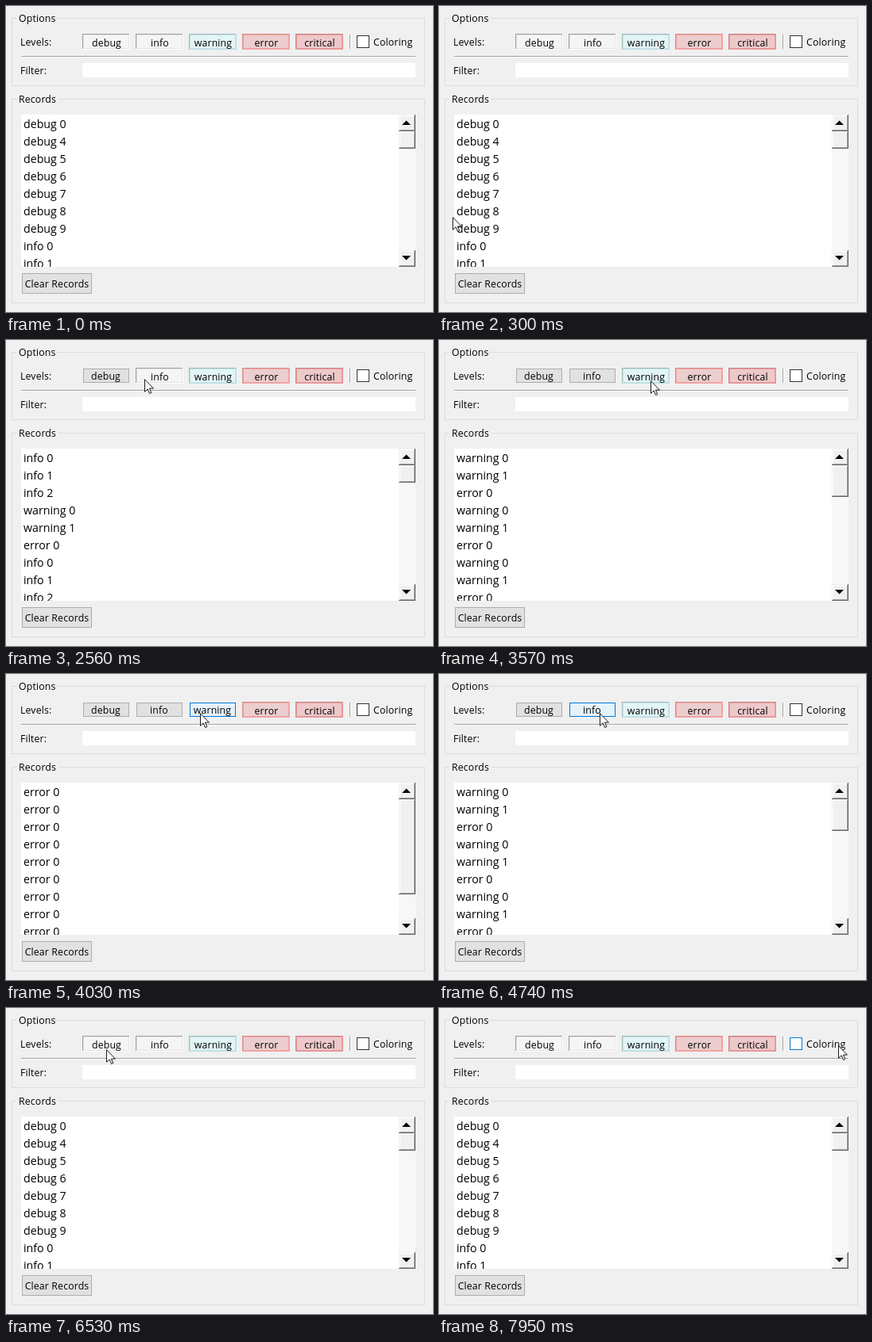
An HTML page that plays this animation: 537 px wide and 386 px high, repeating every 8000 ms.

```html
<!DOCTYPE html>
<html lang="en">
<head>
<meta charset="utf-8">
<title>Log records filter</title>
<style>
  html, body { margin: 0; width: 100%; height: 100%; overflow: hidden; background: #f0f0f0; }
  svg { display: block; }
  text { font: 12.3px "Open Sans", "Noto Sans", sans-serif; letter-spacing: .15px; fill: #000; white-space: pre; }
  .row { font-size: 14.2px; letter-spacing: 0; }
  rect { shape-rendering: crispEdges; }
</style>
</head>
<body>
<svg width="537" height="386" viewBox="0 0 537 386">
  <defs id="defs"></defs>
  <g id="view"></g>
</svg>
<script>
const LOOP = 8000, TICK = 78;

// Mouse glides: start and end time, goal, sideways bow of the path
const ENTRY = { x: 104, y: 400 };
const GLIDES = [
  { from: 140, to: 1000, x: 141, y: 49, bowX: -108 },
  { from: 2560, to: 2620, x: 187, y: 49 },
  { from: 3400, to: 3570, x: 266, y: 51 },
  { from: 3720, to: 3870, x: 244, y: 49 },
  { from: 4740, to: 4740, x: 202, y: 49 },
  { from: 4820, to: 4970, x: 187, y: 46 },
  { from: 5680, to: 5920, x: 126, y: 52 },
  { from: 7390, to: 7950, x: 502, y: 47, bowY: 22 }
];

// Mouse button: [down, up, level]
const CLICKS = [
  [1310, 1460, "debug"], [2870, 3030, "info"], [3870, 4030, "warning"],
  [4510, 4660, "warning"], [5460, 5600, "info"], [6380, 6530, "debug"]
];

// Checked look of each level: fill, outer edge, inner edge, light edge
const LEVELS = {
  debug: ["#f5f5f5", "#a0a0a0", "#e3e3e3", "#fff"],
  info: ["#f5f5f5", "#a0a0a0", "#e3e3e3", "#fff"],
  warning: ["#e2f5f7", "#a0b8ba", "#c4e4e6", "#b9dfe2"],
  error: ["url(#error)", "#d98c8c", "#f0a4a4", "#f7a0a0"],
  critical: ["url(#critical)", "#cf8486", "#e69c9e", "#e89496"]
};

const SETS = 10;
const NUMBERS = { debug: [0, 4, 5, 6, 7, 8, 9], info: [0, 1, 2], warning: [0, 1], error: [0] };

const rect = (x, y, w, h, fill) => `<rect x="${x}" y="${y}" width="${w}" height="${h}" fill="${fill}"/>`;
const framed = (x, y, w, h, fill, edge) => rect(x, y, w, h, edge) + rect(x + 1, y + 1, w - 2, h - 2, fill);
const label = (x, y, s, extra = "") => `<text x="${x}" y="${y}" ${extra}>${s}</text>`;
const bevel = (x, y, w, h, fill, light, dark) =>
  rect(x, y, w, h, dark) + rect(x, y, w - 1, h - 1, light) + rect(x + 1, y + 1, w - 2, h - 2, fill);
const raised = (x, y, w, h) =>
  bevel(x, y, w, h, "#f0f0f0", "#f0f0f0", "#696969") +
  bevel(x + 1, y + 1, w - 2, h - 2, "#f0f0f0", "#fff", "#a0a0a0");
const inside = (p, x, y, w, h) => p && p.x >= x && p.x < x + w && p.y >= y && p.y < y + h;

const checker = (id, a, b) =>
  `<pattern id="${id}" width="2" height="2" patternUnits="userSpaceOnUse">` +
  rect(0, 0, 2, 2, a) + rect(0, 0, 1, 1, b) + rect(1, 1, 1, 1, b) + "</pattern>";

document.getElementById("defs").innerHTML =
  checker("error", "#d9d2d2", "#ffc9c9") + checker("critical", "#ffc2c4", "#dcd0d0") +
  checker("track", "#f0f0f0", "#fff") +
  `<clipPath id="list">${rect(19, 137, 475, 192, "#fff")}</clipPath>`;

function group(y, h, title, gap) {
  return framed(7, y, 520, h, "#f0f0f0", "#dcdcdc") + rect(13, y, gap, 1, "#f0f0f0") + label(16, y + 5, title);
}

function pushButton(x, y, w, h, hover, pressed) {
  if (pressed) return framed(x, y, w, h, "#cce4f7", "#005499");
  return hover ? framed(x, y, w, h, "#e5f1fb", "#0078d7") : framed(x, y, w, h, "#e1e1e1", "#adadad");
}

function levelButton(name, i, on, mouse, down) {
  const x = 96 + 67 * i, [fill, outer, inner, light] = LEVELS[name];
  const hover = inside(mouse, x, 35, 60, 20);
  const sunk = on || (hover && down);
  const face = on
    ? bevel(x, 35, 60, 20, fill, outer, light) + bevel(x + 1, 36, 58, 18, fill, inner, inner)
    : pushButton(x + 1, 36, 58, 18, hover, hover && down);
  return face + label(x + (sunk ? 30.5 : 29.5), sunk ? 51 : 50, name, 'text-anchor="middle"');
}

function list(on, mouse) {
  const shown = Object.keys(NUMBERS).filter(n => on[n]);
  const block = shown.flatMap(n => NUMBERS[n].map(k => `${n} ${k}`));
  const total = block.length * SETS;
  let rows = rect(19, 137, 475, 192, "#fff");
  for (let i = 0; i < 9; i++) {
    const y = 137 + 22 * i;
    if (inside(mouse, 19, y, 475, Math.min(22, 329 - y))) rows += rect(19, y, 475, 22, "#e5f3ff");
    rows += label(22, y + 17, block[i % block.length], 'class="row"');
  }
  return `<g clip-path="url(#list)">${rows}</g>` +
    rect(494, 137, 21, 192, "url(#track)") +
    raised(494, 137, 21, 21) + raised(494, 308, 21, 21) +
    raised(494, 158, 21, Math.max(22, Math.round(150 * 8 / total))) +
    '<path d="M498 150h11l-5.5-5.5zM498 315h11l-5.5 5.5z"/>';
}

// The mouse moves in ticks and slows down towards each goal
function mouseAt(t) {
  let pos = ENTRY;
  for (const { from, to, x, y, bowX = 0, bowY = 0 } of GLIDES) {
    if (t < from) break;
    const span = Math.round((to - from) / TICK);
    const tick = t < to ? Math.floor((t - from) / (to - from) * span) : span;
    const p = Math.sin(Math.PI / 2 * (tick + 1) / (span + 1));
    const bow = Math.sin(Math.PI * p);
    pos = {
      x: Math.round(pos.x + (x - pos.x) * p + bowX * bow),
      y: Math.round(pos.y + (y - pos.y) * p + bowY * bow)
    };
  }
  return pos === ENTRY ? null : pos;
}

function pointer({ x, y }, down) {
  return `<path transform="translate(${x} ${y})" fill="#fff" stroke="#000" stroke-width=".9"
    d="M.5.7V16.3l3.6-3.5 2.5 5.7 2.2-1-2.4-5.4h5z"/>` +
    (down ? `<circle cx="${x}" cy="${y}" r="12" fill="#ff0" fill-opacity=".47"/>` : "");
}

function scene(t) {
  const mouse = mouseAt(t);
  const down = CLICKS.some(([a, b]) => t >= a && t < b);
  const isOn = name => CLICKS.filter(c => c[2] === name && c[1] <= t).length % 2 === 0;
  const names = Object.keys(LEVELS);
  const on = Object.fromEntries(names.map(n => [n, isOn(n)]));

  const boxEdge = inside(mouse, 441, 37, 70, 17) ? "#0078d7" : "#333";
  return group(15, 86, "Options", 49) + group(117, 258, "Records", 53) +
    label(18, 50, "Levels:") + label(18, 86, "Filter:") +
    names.map((n, i) => levelButton(n, i, on[n], mouse, down)).join("") +
    rect(432, 36, 1, 18, "#a0a0a0") + rect(433, 36, 1, 18, "#fff") +
    framed(441, 37, 16, 16, "#fff", boxEdge) + label(462, 50, "Coloring") +
    rect(19, 63, 496, 1, "#a0a0a0") + rect(19, 64, 496, 1, "#fff") +
    rect(96, 72, 419, 18, "#fff") +
    list(on, mouse) +
    pushButton(20, 337, 88, 26, inside(mouse, 20, 337, 88, 26), false) +
    label(64, 355, "Clear Records", 'text-anchor="middle"') +
    (mouse ? pointer(mouse, down) : "");
}

const view = document.getElementById("view");
const start = performance.now();
let last = "";

function draw() {
  const next = scene((performance.now() - start) % LOOP);
  if (next !== last) view.innerHTML = last = next;
  requestAnimationFrame(draw);
}
draw();
</script>
</body>
</html>
```
